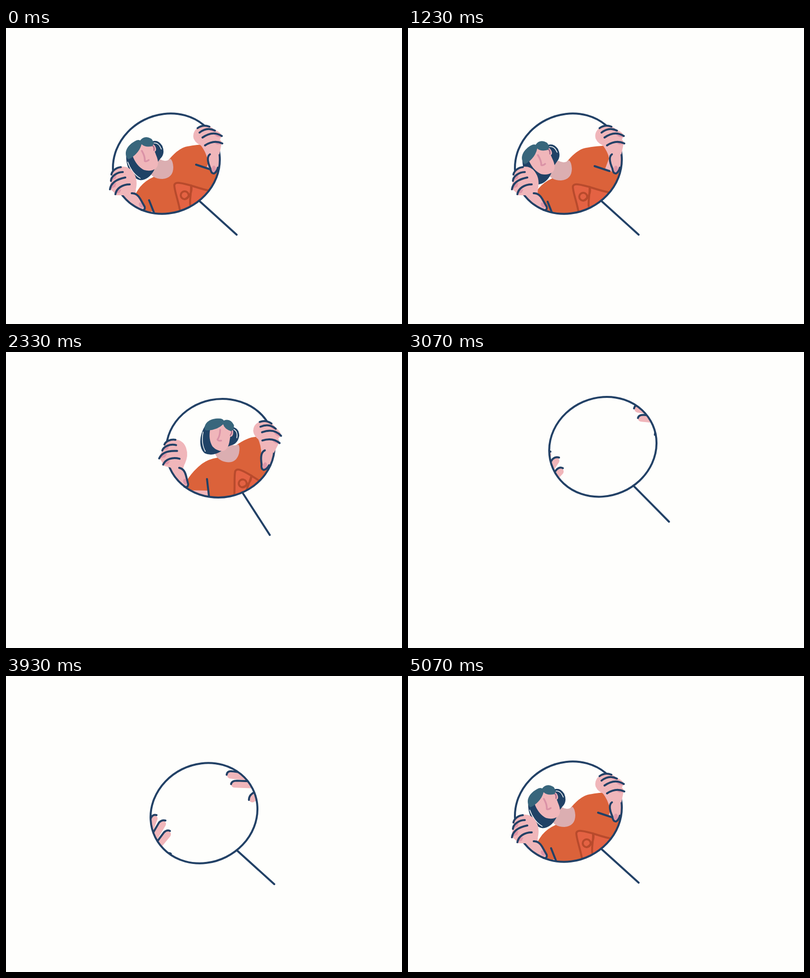
Recreate the animation shown at these times as an HTML page. Size 800 by 600 pixels, loop 5.11 s.

```html
<!DOCTYPE html>
<html lang="en">
<head>
<meta charset="utf-8">
<title>Magnifier</title>
<style>
  html, body { margin: 0; width: 100%; height: 100%; overflow: hidden; background: #fefefc; }
  svg { display: block; width: 100vw; height: 100vh; }
  path, circle, line, ellipse { stroke-linecap: round; stroke-linejoin: round; }
  .ink { fill: none; stroke: #224166; stroke-width: 4; }
  .skin { fill: #f0b6ba; }
  .finger { fill: none; stroke: #f0b6ba; stroke-width: 14; }
  .tip { fill: #de96a8; }
  .hair { fill: #204266; }
  .shirt { fill: #db623a; }
  .seam { fill: none; stroke: #b84a2c; stroke-width: 4; }
</style>
</head>
<body>
<svg viewBox="0 0 800 600">
  <defs>
    <clipPath id="glass"><ellipse rx="110" ry="99.5" transform="rotate(-26.7)"/></clipPath>
  </defs>
  <g id="lens">
    <g clip-path="url(#glass)">
      <g id="upright">
        <g id="body">
          <g transform="translate(-324 -275)">
            <path class="skin" d="M254 376L298 366L306 402L266 412Z"/>
            <path class="shirt" d="M246 384Q250 350 271 322Q282 309 298 302L328 268Q346 246 362 241Q378 237 410 235L413 262L406 282L450 294L450 420L308 420L298 371Z"/>
            <path class="skin" d="M413 262L405 283L424 290L440 262Z"/>
            <path d="M289 290Q295 306 316 306Q338 304 338 282Q337 268 332 265Q322 273 311 266L300 272Z" fill="#dbaeb1"/>
            <path d="M354 385C350 353 341 335 340 319Q341 313 350 314C370 316 386 325 412 330L404 400Z" fill="#e46243"/>
            <path class="seam" d="M354 385C350 353 341 335 340 319Q341 313 350 314C370 316 386 325 412 330M374 319C378 336 366 345 361 347M374 319C374 340 371 344 372 358"/>
            <circle class="seam" cx="361" cy="339" r="8"/>
            <path class="ink" d="M289 349L302 382M384 277L414 287"/>
          </g>
        </g>
        <g id="head">
          <g transform="translate(-397 -200)">
            <path class="hair" d="M366 172C352 190 348 222 364 235Q380 242 398 230L406 222L420 216Q434 212 436 195Q435 178 420 177Z"/>
            <path d="M359 190Q355 214 365 231M424 182Q433 186 431 200" fill="none" stroke="#fefefc" stroke-width="1.5"/>
            <path class="skin" d="M374 182Q370 205 380 220Q390 230 402 229Q414 226 416 205L420 178Q400 166 380 172Z"/>
            <ellipse class="skin" cx="418" cy="189" rx="5" ry="9"/>
            <path d="M418 184Q422 188 417 195" fill="none" stroke="#a9698a" stroke-width="2.5"/>
            <path d="M362 184C360 168 376 160 392 160Q400 160 402 164Q416 158 424 173Q425 184 418 186Q404 182 401 172Q390 184 370 186Q364 187 362 184Z" fill="#38667c"/>
            <path d="M395 184Q395 198 390 205Q392 208 398 207" fill="none" stroke="#da92a6" stroke-width="3.5"/>
          </g>
        </g>
      </g>
      <g id="leftPalm">
        <g transform="translate(-382 -207)">
          <path class="skin" d="M276 232Q283 210 295 188L328 190L346 216L336 248L316 259L306 300L270 295L260 250Z"/>
          <path class="finger" d="M303 196L311 156M318 192L333 152M328 200L350 163M335 214L360 184M328 239L362 230"/>
          <path class="ink" d="M298 190L304 155Q307 147 314 148M311 190L327 150Q331 143 338 145M321 198L343 160Q349 154 356 156M327 215L353 180Q359 174 365 177M324 232Q342 225 362 222Q367 222 367 224"/>
        </g>
      </g>
      <g id="rightPalm">
        <g transform="translate(-382 -207)">
          <path class="skin" d="M415 123Q440 121 458 128L500 160L506 200L486 192L458 180L435 189L412 177L408 135Z"/>
          <path class="finger" d="M415 129L385 114M412 140L366 129M415 154L365 149M425 169L373 167M440 175L409 197"/>
          <path class="ink" d="M418 122L388 107Q380 104 377 109M410 133L370 121Q360 120 358 127M412 147L368 141Q358 140 357 148M421 162L378 160Q367 160 366 167M434 171Q420 178 409 186Q402 191 402 199"/>
        </g>
      </g>
      <g class="grip">
        <g transform="translate(-324 -275)">
          <path class="skin" d="M226 320L263 315L262 334Q268 340 281 363Q282 371 272 370L234 344Z"/>
          <ellipse class="tip" cx="273" cy="359" rx="4" ry="6" transform="rotate(-35 273 359)"/>
          <path class="skin" d="M392 225L436 230L434 270L427 290Q422 297 415 291L408 270Q404 250 392 236Z"/>
          <ellipse class="tip" cx="420" cy="286" rx="4" ry="7"/>
        </g>
      </g>
    </g>
    <g transform="translate(-324 -275)">
      <ellipse class="ink" cx="324" cy="275" rx="110" ry="99.5" transform="rotate(-26.7 324 275)"/>
      <line class="ink" x1="390" y1="350" x2="466" y2="419"/>
      <g class="grip">
        <path class="skin" d="M213 296Q218 282 234 281Q250 280 258 294Q266 306 263 324L255 340L236 339L222 339Q219 333 212 328Q208 320 213 308Z"/>
        <path class="tip" d="M213 309Q216 299 223 298L222 305ZM211 326Q213 315 223 314L221 322ZM222 336Q225 327 233 327L230 334Z"/>
        <path class="ink" d="M213 297C214 290 222 283 232 282M212 310C212 301 224 292 236 292M210 327C212 313 226 306 241 303M221 337C223 325 235 317 250 317M254 335Q264 334 271 346L280 362Q282 370 274 369"/>
        <path class="skin" d="M386 203Q398 194 411 199L423 207Q434 211 436 219L432 226Q438 231 435 237L431 256L411 258L400 240Q384 236 379 224Q376 212 386 203Z"/>
        <path class="tip" d="M408 203Q418 203 421 210Q413 211 408 203ZM419 214Q430 214 435 220Q426 224 419 214ZM420 231Q431 229 435 235Q426 239 420 231Z"/>
        <path class="ink" d="M387 203Q398 195 411 200M391 212Q406 200 422 208M397 222Q418 207 436 219M402 238Q420 226 437 234M412 256C404 262 409 276 413 285Q414 295 420 295Q426 292 428 283"/>
      </g>
    </g>
  </g>
</svg>
<script>
const LOOP = 5110;
const $ = id => document.getElementById(id);
const grips = document.querySelectorAll('.grip');

// Smooth progress from 0 to 1 between two times
function ease(t, from, to) {
  const u = Math.min(1, Math.max(0, (t - from) / (to - from)));
  return u * u * (3 - 2 * u);
}

function place(el, x, y, angle = 0, scale = 1) {
  el.setAttribute('transform', `translate(${x} ${y}) rotate(${angle}) scale(${scale})`);
}

function moveLens(t) {
  const lift = ease(t, 1290, 1670);
  const slip = ease(t, 2760, 3240);
  const dip = ease(t, 3270, 3850);
  const rise = ease(t, 4150, 4400);
  const sway = ease(t, 4440, 4770);
  const home = ease(t, 4790, 5060);
  const x = 324 + 109 * lift - 55 * slip + 22 * dip - 40 * rise + 33 * sway - 69 * home;
  const y = 275 - 80 * lift - 4 * slip + 87 * dip - 39 * rise + 22 * sway + 14 * home;
  const tilt = 15 * lift - 16.4 * slip + 1.4 * dip + 4 * (rise - sway);
  place($('lens'), x, y, tilt);
  place($('upright'), 0, 0, -tilt);
  return tilt;
}

function movePerson(t, tilt) {
  const lean = ease(t, 450, 1000) - ease(t, 1260, 1500);
  const hidden = ease(t, 2700, 3020) - ease(t, 3950, 4300);
  const away = ease(t, 3050, 3100);
  const settle = ease(t, 4450, 5070);
  const pose = ease(t, 1290, 1600) - 0.58 * away - 0.42 * settle;
  const far = away - settle;
  const sink = 230 * hidden;
  place($('body'), 26 * pose - 7 * lean, 3 * lean + sink, tilt, 1 - 0.12 * far);
  place($('head'), 41 * pose - 40 - 11.5 * lean, 8 * lean - 13 - 9 * pose + sink,
    31 * pose - 29 - 3 * lean, 1 - 0.05 * pose - 0.14 * far);
}

function moveHands(t) {
  const out = 1 - ease(t, 2960, 3200) + ease(t, 3830, 4040);
  place($('leftPalm'), -110 * out, 140 * out);
  place($('rightPalm'), 150 * out, -40 * out);
  const holding = t < 3060 || t > 3960;
  grips.forEach(g => g.setAttribute('visibility', holding ? 'visible' : 'hidden'));
}

function draw(t) {
  movePerson(t, moveLens(t));
  moveHands(t);
}

const start = performance.now();
function tick() {
  draw((performance.now() - start) % LOOP);
  requestAnimationFrame(tick);
}
tick();
</script>
</body>
</html>
```
